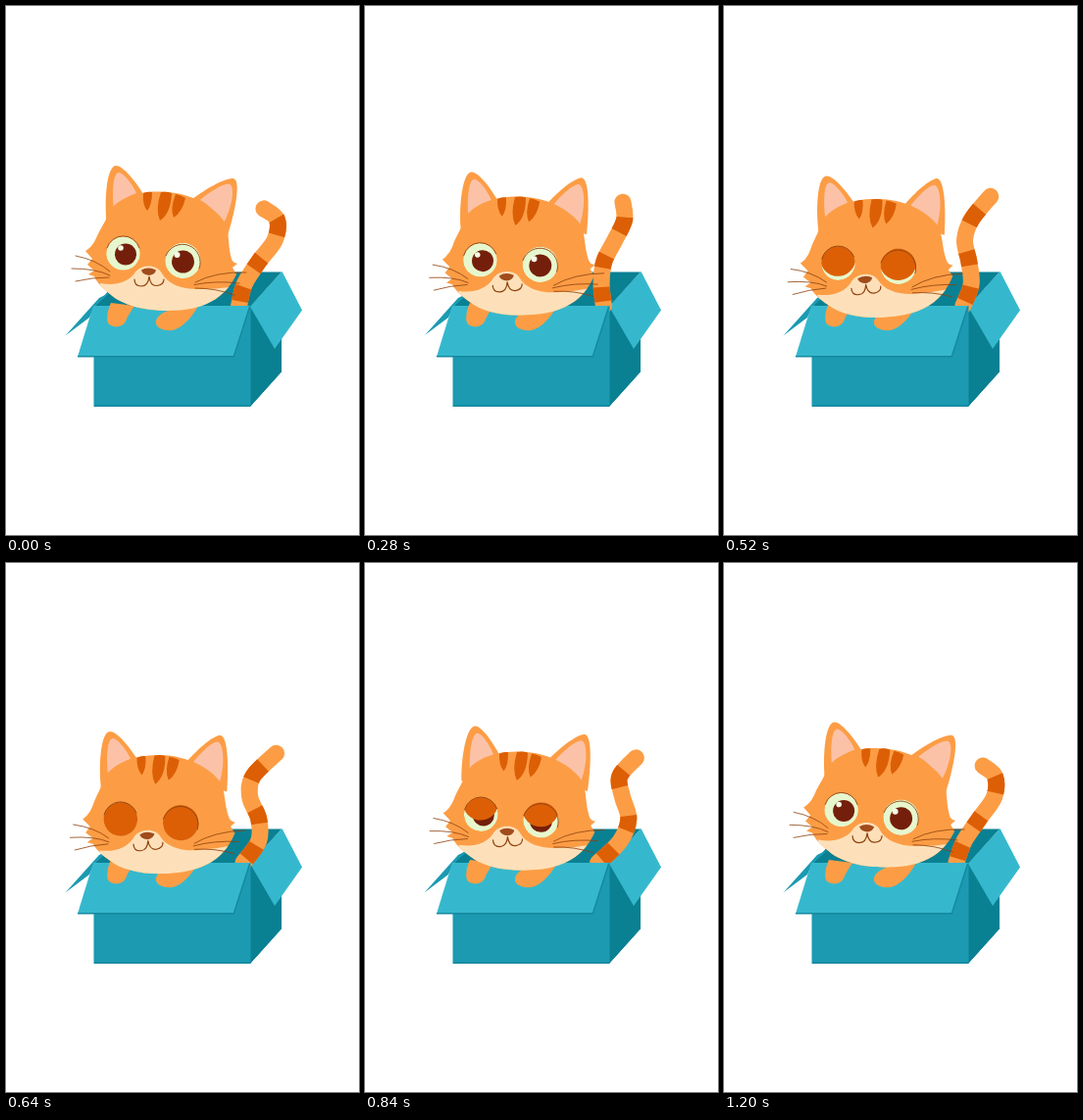
Write an HTML page that moves like this. It is 360 px wide and 540 px high and loops after 1240 ms.

```html
<!DOCTYPE html>
<html lang="en">
<head>
<meta charset="utf-8">
<title>Cat in a box</title>
<style>
html, body { margin: 0; width: 100%; height: 100%; overflow: hidden; background: #fff; }
svg { display: block; width: 100vw; height: 100vh; }
.fur { fill: #fc9d45; }
.dark { fill: #dc5f06; }
.pink { fill: #fcc2a8; }
.cream { fill: #fde0b9; }
.light { fill: #35b8cd; }
.mid { fill: #1b9ab2; }
.deep { fill: #0a8093; }
.line { fill: none; stroke: #8f420f; stroke-linecap: round; }
.tail { fill: none; stroke-width: 17; }
</style>
</head>
<body>
<svg viewBox="0 0 360 540">
  <defs>
    <path id="skull" d="M104 212C112 197 133 189 157 189.500C190 190 214 206 224 222C228 232 226 245 230 258Q231 262 236 263L231 267L235 274C230 284 224 292 214 299C200 308 184 311 165 311C140 311 118 305 106 294C98 288 92 281 90 276L84 274L90 270L83 264L88 258L81 250Q88 246 92 237C97 225 101 222 104 212Z"/>
    <clipPath id="face"><use href="#skull"/></clipPath>
    <clipPath id="eyeL"><circle cx="119.500" cy="252.500" r="17.300"/></clipPath>
    <clipPath id="eyeR"><circle cx="180.500" cy="260" r="18.200"/></clipPath>
  </defs>

  <path class="deep" d="M90 307L122 271.500H281L249 307Z"/>
  <path class="mid" d="M60.500 336.500L95 298L107 292L90 307L85 318Z"/>
  <path class="deep" d="M249 307L281 272V373L249 409Z"/>
  <path class="light" d="M249 307L281.500 271L302 310.500L274 350Z"/>

  <path id="tail" class="tail" stroke="#fc9d45" stroke-linecap="round"/>
  <path id="bands" class="tail" stroke="#dc5f06" pathLength="100" stroke-dasharray="0 4 13 18 12 24 15 100"/>

  <path class="mid" d="M89.500 306H249.500V409H89.500Z"/>
  <path d="M90 408.300H249L281 373" fill="none" stroke="#0b7f95"/>
  <path class="light" d="M89 306H248.500L232.500 358H73Z"/>
  <path d="M73 357.700H232.300L248.500 307" fill="none" stroke="#1589a0" stroke-width="1.400"/>

  <path class="fur" d="M107 303C103 312 102 321 105 325C111 329 119 328 122 322C124 316 128 311 131 306Z"/>
  <path class="fur" d="M196 306C191 315 184 325 173 330C165 333 154 330 153 324C152 317 160 312 171 309Z"/>

  <g id="head">
    <g id="earL">
      <path class="fur" d="M102.500 220C100 195 103 163 112 163C120 163 134 182 140 192L125 215Z"/>
      <path class="pink" d="M110 208C108 190 109 170 115 170C121 171 130 184 133 191C122 195 114 201 110 208Z"/>
    </g>
    <g id="earR">
      <path class="fur" d="M190 197C205 186 222 176 232 176C240 178 234 208 226 234L205 222Z"/>
      <path class="pink" d="M198 198C209 189 222 181 228 182C234 184 231 206 221 223C215 211 207 203 198 198Z"/>
    </g>
    <use href="#skull" class="fur"/>
    <path class="cream" clip-path="url(#face)" d="M96 283C112 286 124 282 131 273C137 263 154 263 159 273C165 284 180 290 200 289Q214 289 228 287V315H96Z"/>
    <path class="dark" d="M140 191Q145 189 149 190Q149 203 144 209Q139 203 140 191Z
      M158 190Q164 189 169 191Q168 212 157 219Q152 208 158 190Z
      M173 192Q178 193 183 196Q180 210 171 216Q167 207 173 192Z"/>
    <g clip-path="url(#eyeL)">
      <circle cx="119.500" cy="252.500" r="17.300" fill="#e7f7cd"/>
      <circle cx="122" cy="253.500" r="11" fill="#741f0b"/>
      <circle cx="117" cy="247" r="2.800" fill="#f4fbe6"/>
      <circle class="lid dark" cx="119.500" cy="252.500" r="18"/>
    </g>
    <g clip-path="url(#eyeR)">
      <circle cx="180.500" cy="260" r="18.200" fill="#e7f7cd"/>
      <circle cx="180.500" cy="261" r="11.500" fill="#741f0b"/>
      <circle cx="174.500" cy="254" r="3" fill="#f4fbe6"/>
      <circle class="lid dark" cx="180.500" cy="260" r="19"/>
    </g>
    <path class="line" stroke-width=".9" d="M103 247A17.300 17.300 0 0 1 136 247M163 255A18.200 18.200 0 0 1 197 268"/>
    <path d="M138 269.500Q145 265.500 153 269.500Q152 274 146 275Q139 274 138 269.500Z" fill="#a04c1c"/>
    <path class="line" stroke-width="1.200" d="M131 279Q131 286 138 286Q145 286 146 276Q147 286 154 285.500Q161 284.500 161 279"/>
    <path class="line" stroke-width=".8" d="M106 271Q92 259 71 255M106 275Q92 268 67 268M105 277Q88 277 71 281
      M193 282Q214 271 245 272M192 284.500Q214 280 238 283M193 288Q214 288 233 295"/>
  </g>
</svg>
<script>
const LOOP = 1240, STEP = 40;
const el = id => document.getElementById(id);
const lids = document.querySelectorAll('.lid');

// 1 at the given time, -1 half a loop later
const wave = (t, peak) => Math.cos(2 * Math.PI * (t - peak) / LOOP);

// the swing runs up the tail: each joint lags the one below
const joints = [
  { x: 240, y: 306, swing: 4.5, lag: -200 },
  { x: 250, y: 284, swing: 10.5, lag: 170 },
  { x: 257, y: 261, swing: 13.5, lag: 320 },
  { x: 261, y: 239, swing: 15.5, lag: 510 },
  { x: 264, y: 218, swing: 12.5, lag: 600 },
  { x: 269, y: 200.5, swing: 8, lag: 140 }
];

function tailAt(t) {
  const pts = joints.map(j => [j.x - j.swing * wave(t, j.lag), j.y]);
  pts[pts.length - 1][1] -= 6.5 * wave(t, 580);
  return pts;
}

// smooth path through the points
function curve(pts) {
  const at = i => pts[Math.max(0, Math.min(pts.length - 1, i))];
  let d = 'M' + pts[0];
  for (let i = 0; i < pts.length - 1; i++) {
    const [a, b, c, e] = [at(i - 1), at(i), at(i + 1), at(i + 2)];
    const c1 = b.map((v, k) => v + (c[k] - a[k]) / 6);
    const c2 = c.map((v, k) => v - (e[k] - b[k]) / 6);
    d += `C${c1} ${c2} ${c}`;
  }
  return d;
}

function ease(t, from, to) {
  const u = Math.max(0, Math.min(1, (t - from) / (to - from)));
  return u * u * (3 - 2 * u);
}

const set = (node, value) => node.setAttribute('transform', value);
const sink = t => (1 - wave(t, -110)) / 2;

function draw(t) {
  const d = curve(tailAt(t));
  el('tail').setAttribute('d', d);
  el('bands').setAttribute('d', d);

  const s = sink(t) - sink(0);
  set(el('head'), `translate(${-3.5 * s} ${8 * s}) rotate(${-4.4 * s} 158 250)`);

  // ears flick outwards once, near the start of the loop
  const rest = 1 - Math.cos(Math.PI * (t + 20) / LOOP) ** 24;
  set(el('earL'), `rotate(${rest * (9 - 7 * s)} 120 202)`);
  set(el('earR'), `rotate(${rest * (-6 - 4 * s)} 212 212)`);

  const shut = ease(t, 380, 560) - ease(t, 780, 940);
  lids.forEach(lid => set(lid, `translate(0 ${-38 * (1 - shut)})`));
}

const start = performance.now();
function tick() {
  let n = Math.floor((performance.now() - start) % LOOP / STEP);
  if (n === 26) n = 25; // one held step
  draw(n * STEP);
  requestAnimationFrame(tick);
}
tick();
</script>
</body>
</html>
```
